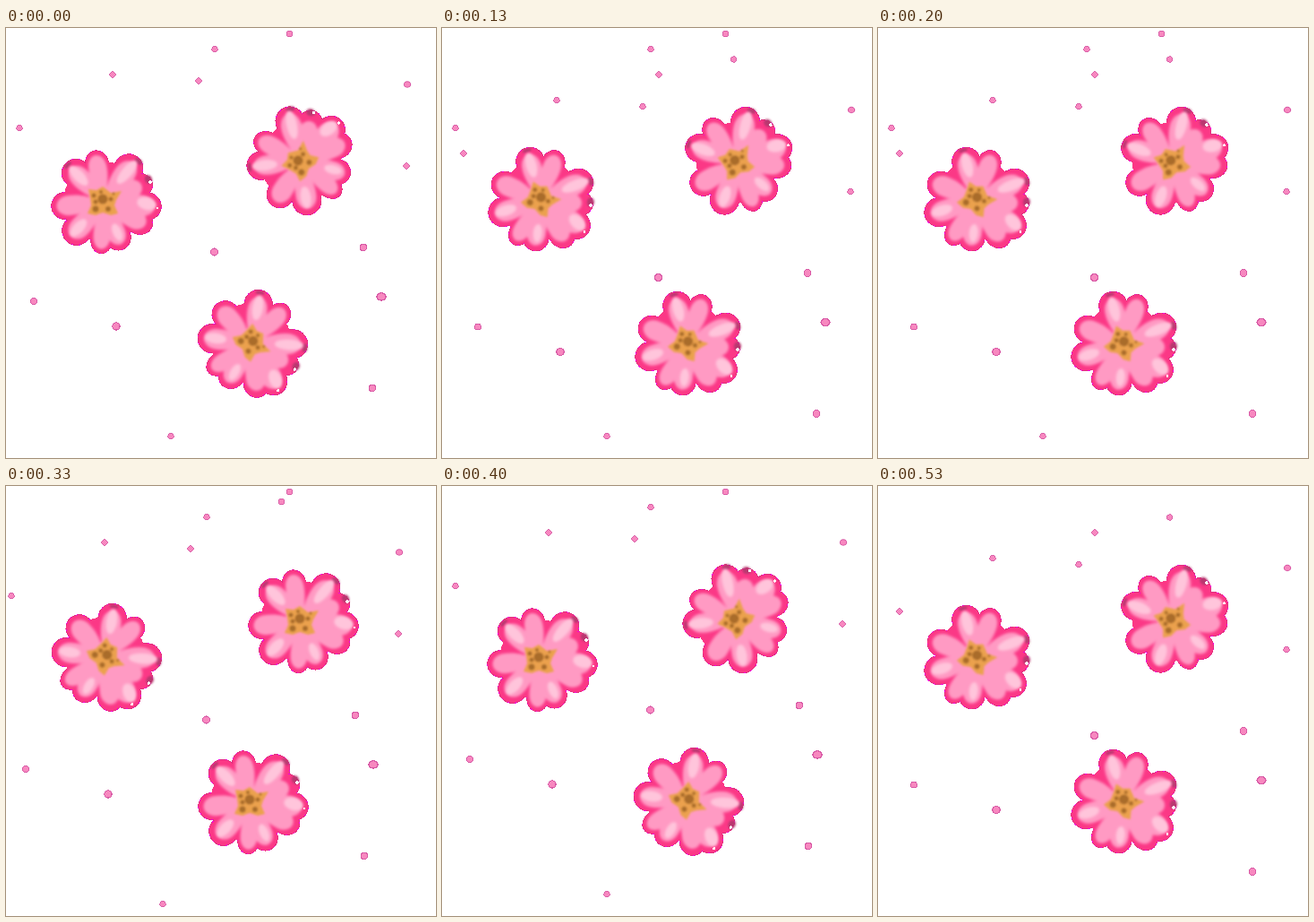
An HTML page without scripts that plays this animation: 480 by 480 pixels, repeating every 590 ms.

```html
<!DOCTYPE html>
<html lang="en">
<head>
<meta charset="utf-8">
<title>Pink flowers</title>
<style>
  html, body { margin: 0; width: 100%; height: 100%; overflow: hidden; background: #fff; }
  svg { display: block; width: 100vw; height: 100vh; }

  .pose { animation: 590ms step-end infinite; }
  .first { animation-name: first; }
  .second { animation-name: second; visibility: hidden; }
  .third { animation-name: third; visibility: hidden; }
  .edge { animation-name: edge; }
  .top { animation-name: top; }

  /* hard pose changes at 70, 130, 270, 330, 400 and 530 ms */
  @keyframes first {
    0%, 67.79% { visibility: visible; }
    22.03%, 89.83% { visibility: hidden; }
  }
  @keyframes second {
    0%, 45.76% { visibility: hidden; }
    11.86%, 89.83% { visibility: visible; }
  }
  @keyframes third {
    0%, 67.79% { visibility: hidden; }
    45.76% { visibility: visible; }
  }
  @keyframes edge {
    0%, 67.79% { visibility: visible; }
    55.93%, 89.83% { visibility: hidden; }
  }
  @keyframes top {
    0% { visibility: visible; }
    89.83% { visibility: hidden; }
  }
</style>
</head>
<body>
<svg viewBox="0 0 480 480">
  <defs>
    <filter id="soft" x="-20%" y="-20%" width="140%" height="140%"><feGaussianBlur stdDeviation="1.5"/></filter>
    <filter id="fine" x="-20%" y="-20%" width="140%" height="140%"><feGaussianBlur stdDeviation=".8"/></filter>

    <path id="p" d="M0 0C20-10 32-17 46-16C55-15 60-7 60 0C60 7 55 15 46 16C32 17 20 10 0 0Z"/>
    <path id="i" d="M0 0C17-9 29-13 42-12C51-11 55-5 55 0C55 5 51 11 42 12C29 13 17 9 0 0Z"/>

    <g id="petals">
      <use href="#p" transform="rotate(-24) scale(.97 .85)"/>
      <use href="#p" transform="rotate(-100) scale(.96 .8)"/>
      <use href="#p" transform="rotate(-53) scale(1.04 .98)"/>
      <use href="#p" transform="rotate(6) scale(1.07 .96)"/>
      <use href="#p" transform="rotate(29) scale(1.01 .88)"/>
      <use href="#p" transform="rotate(68) scale(.95 .88)"/>
      <use href="#p" transform="rotate(93) scale(.96 .74)"/>
      <use href="#p" transform="rotate(133) scale(1 .98)"/>
      <use href="#p" transform="rotate(174) scale(.97 .92)"/>
      <use href="#p" transform="rotate(226) scale(1 .96)"/>
    </g>
    <g id="inners">
      <use href="#i" transform="rotate(-24) scale(.84 .85)"/>
      <use href="#i" transform="rotate(-100) scale(.96 .84)"/>
      <use href="#i" transform="rotate(-53) scale(1 .96)"/>
      <use href="#i" transform="rotate(6) scale(1.04 .98)"/>
      <use href="#i" transform="rotate(29) scale(.97 .9)"/>
      <use href="#i" transform="rotate(68) scale(.93 .86)"/>
      <use href="#i" transform="rotate(93) scale(.96 .78)"/>
      <use href="#i" transform="rotate(133) scale(.97 .94)"/>
      <use href="#i" transform="rotate(174) scale(.96 .92)"/>
      <use href="#i" transform="rotate(226) scale(.95 .9)"/>
      <circle r="17"/>
    </g>

    <g id="flower">
      <g shape-rendering="crispEdges">
        <use href="#petals" fill="none" stroke="#e0307f" stroke-width="1.6"/>
        <use href="#petals" fill="none" stroke="#f400e0" stroke-width="1.6" stroke-dasharray="2 6"/>
        <use href="#petals" fill="#fb3886"/>
        <circle r="45" fill="#fb3886"/>
      </g>
      <g fill="#b8376f" filter="url(#fine)">
        <ellipse cx="39" cy="-45" rx="5" ry="3" transform="rotate(38 39 -45)"/>
        <ellipse cx="50" cy="-25" rx="4" ry="5" transform="rotate(-26 50 -25)"/>
        <ellipse cx="-40" cy="-41" rx="5" ry="2" transform="rotate(-45 -40 -41)"/>
      </g>
      <use href="#inners" fill="#ff9ac3" filter="url(#soft)"/>
      <g fill="#ffc5db" filter="url(#soft)">
        <ellipse rx="14" ry="6" transform="translate(-28 -29) rotate(46)"/>
        <ellipse rx="16" ry="6" transform="translate(26 -33) rotate(-50)"/>
        <ellipse rx="11" ry="7" transform="translate(48 2) rotate(15)"/>
        <ellipse rx="10" ry="5" transform="translate(15 34) rotate(66)"/>
        <ellipse rx="12" ry="6" transform="translate(-28 29) rotate(133)"/>
      </g>
      <g filter="url(#fine)">
        <path fill="#eba14d" d="M-17-14L-8-13L-1-17L8-10L20-12L14-2L12 4L16 13L8 15L-1 12L-9 15L-18 13L-14 4L-15-4Z"/>
        <g fill="#a96c2a">
          <circle cx="-1" cy="-3" r="5.5"/>
          <circle cx="-11" cy="-7" r="2.5"/>
          <circle cx="-9" cy="8" r="3.5"/>
          <circle cx="5" cy="8" r="3"/>
          <circle cx="8" cy="-3" r="2.5"/>
          <circle cx="-3" cy="-11" r="2"/>
          <circle cx="-9" cy="0" r="2.5"/>
          <circle cx="11" cy="-9" r="1.5"/>
        </g>
      </g>
      <g fill="#fff" shape-rendering="crispEdges">
        <circle cx="52" cy="-22" r="1.8"/>
        <circle cx="60" cy="7" r="1.5"/>
      </g>
    </g>

    <circle id="dot" r="3.2" fill="#f788bf" stroke="#d85aa6" stroke-width=".9" shape-rendering="crispEdges"/>

    <g id="near">
      <use href="#dot" x="119" y="52"/>
      <use href="#dot" x="215" y="59"/>
      <use href="#dot" transform="translate(448 63) scale(1.15 1)"/>
      <use href="#dot" x="447" y="154"/>
      <use href="#dot" transform="translate(232.5 250) scale(1.25)"/>
      <use href="#dot" transform="translate(399 245) scale(1.2)"/>
      <use href="#dot" transform="translate(419 300) scale(1.55 1.3)"/>
      <use href="#dot" transform="translate(31 305) scale(1.1)"/>
      <use href="#dot" transform="translate(123 333) scale(1.3)"/>
      <use href="#dot" transform="translate(409 402) scale(1.2)"/>
    </g>
    <g id="edge">
      <use href="#dot" x="233" y="23.5"/>
      <use href="#dot" x="15" y="111.5"/>
      <use href="#dot" x="184" y="455.5"/>
    </g>
    <use id="top" href="#dot" x="316.5" y="6.5"/>
    <g id="dots">
      <use href="#near"/><use href="#edge"/><use href="#top"/>
    </g>
  </defs>

  <rect width="480" height="480" fill="#fff"/>

  <use href="#top" class="pose top"/>
  <use href="#edge" class="pose edge"/>

  <g class="pose first">
    <use href="#near"/>
    <use href="#flower" transform="translate(109 194)"/>
    <use href="#flower" transform="translate(329 149) rotate(-52)"/>
    <use href="#flower" transform="translate(274 352) rotate(54)"/>
  </g>

  <g class="pose second">
    <use href="#dots" transform="translate(9 28.5)"/>
    <use href="#flower" transform="translate(110 192) rotate(29)"/>
    <use href="#flower" transform="translate(329 150) rotate(-25)"/>
    <use href="#flower" transform="translate(274 353) rotate(29)"/>
  </g>

  <g class="pose third">
    <use href="#dots" transform="translate(-9 11)"/>
    <use href="#flower" transform="translate(111 191) rotate(54)"/>
    <use href="#flower" transform="translate(329 151)"/>
    <use href="#flower" transform="translate(273 353)"/>
  </g>
</svg>
</body>
</html>
```
